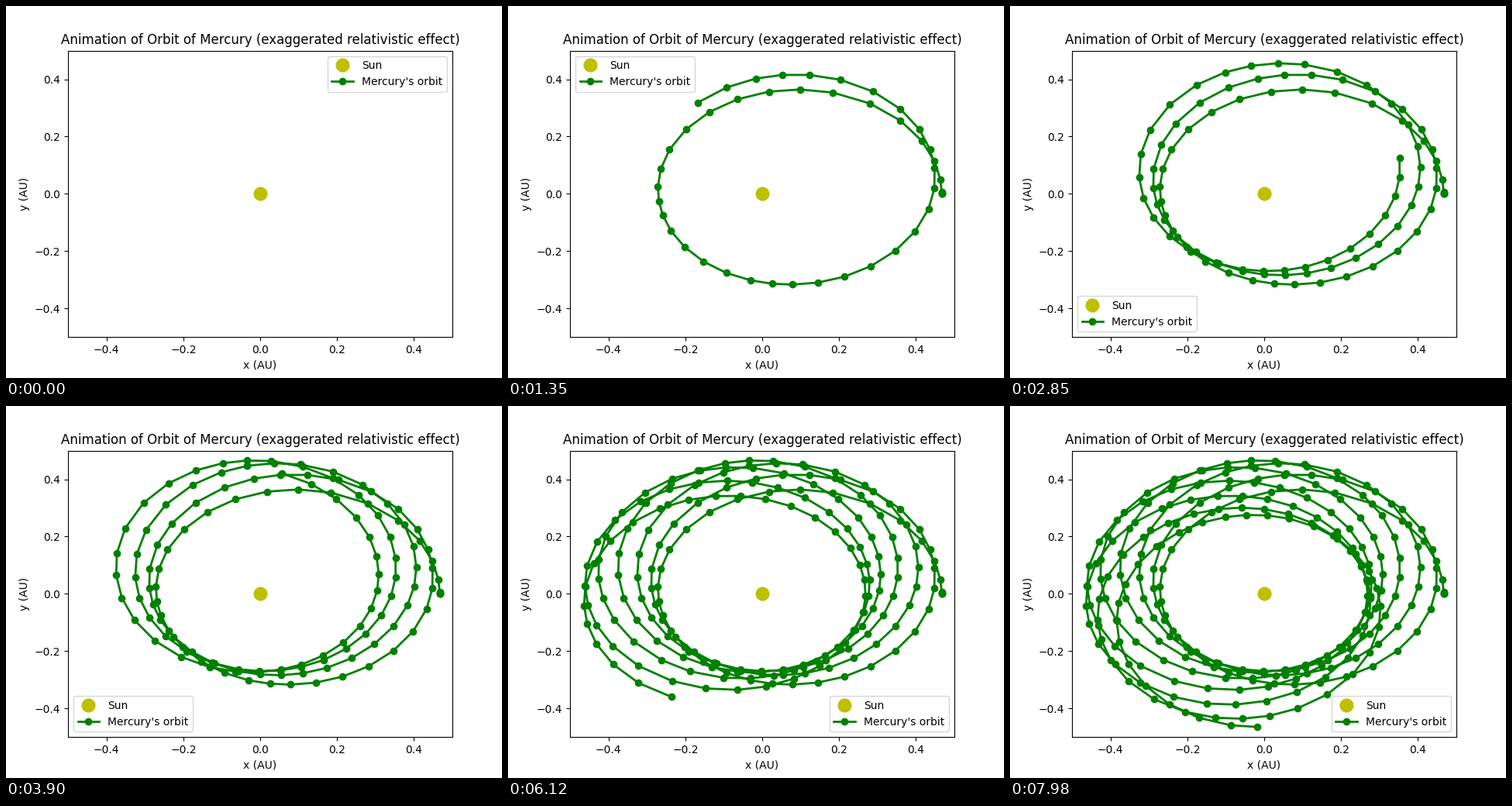
These frames come from a looping animation (640x480 px, 8000 ms). A matplotlib script:

```python
import numpy as np
import matplotlib.pyplot as plt
from matplotlib.animation import FuncAnimation

GM = 4 * np.pi ** 2      # AU^3 / yr^2
ALPHA = 0.01             # exaggerated relativistic term, AU^2
START = (0.467, 0.0, 0.0, 8.2)
RTOL, ATOL = 1e-6, 1e-9
FRAMES = 267
LOOP_MS = 8000

# Dormand-Prince 5(4) coefficients
A = [
    [],
    [1 / 5],
    [3 / 40, 9 / 40],
    [44 / 45, -56 / 15, 32 / 9],
    [19372 / 6561, -25360 / 2187, 64448 / 6561, -212 / 729],
    [9017 / 3168, -355 / 33, 46732 / 5247, 49 / 176, -5103 / 18656],
    [35 / 384, 0, 500 / 1113, 125 / 192, -2187 / 6784, 11 / 84],
]
E = np.array([-71 / 57600, 0, 71 / 16695, -71 / 1920,
              17253 / 339200, -22 / 525, 1 / 40])


def deriv(s):
    pos, vel = s[:2], s[2:]
    r2 = pos @ pos
    acc = -GM * pos / r2 ** 1.5 * (1 + ALPHA / r2)
    return np.concatenate([vel, acc])


def rms(v):
    return np.sqrt(np.mean(v ** 2))


def first_step(s):
    scale = ATOL + np.abs(s) * RTOL
    f = deriv(s)
    d0, d1 = rms(s / scale), rms(f / scale)
    h = 0.01 * d0 / d1
    d2 = rms((deriv(s + h * f) - f) / scale) / h
    return min(100 * h, (0.01 / max(d1, d2)) ** 0.2)


def try_step(s, h):
    k = [deriv(s)]
    for row in A[1:]:
        new = s + h * (np.array(row) @ np.array(k))
        k.append(deriv(new))
    scale = ATOL + np.maximum(np.abs(s), np.abs(new)) * RTOL
    return new, rms(h * (E @ np.array(k)) / scale)


def orbit(count):
    s = np.array(START)
    h = first_step(s)
    path = [s]
    while len(path) < count:
        rejected = False
        while True:
            new, err = try_step(s, h)
            factor = 0.9 * max(err, 1e-12) ** -0.2
            if err < 1:
                break
            h *= max(0.2, factor)
            rejected = True
        h *= min(1 if rejected else 10, factor)
        s = new
        path.append(s)
    return np.array(path)[:, :2].T


xs, ys = orbit(FRAMES)

fig, ax = plt.subplots(figsize=(6.4, 4.8), dpi=100)
ax.set_xlim(-0.5, 0.5)
ax.set_ylim(-0.5, 0.5)
ax.set_xlabel("x (AU)")
ax.set_ylabel("y (AU)")
ax.set_title("Animation of Orbit of Mercury (exaggerated relativistic effect)")
ax.plot(0, 0, "yo", markersize=12, label="Sun")
line, = ax.plot([], [], "go-", lw=2, label="Mercury's orbit")
ax.legend(loc="best")


def update(i):
    line.set_data(xs[:i], ys[:i])
    return line,


anim = FuncAnimation(fig, update, frames=FRAMES, interval=LOOP_MS / FRAMES,
                     repeat=True, repeat_delay=0)
plt.show()
```
